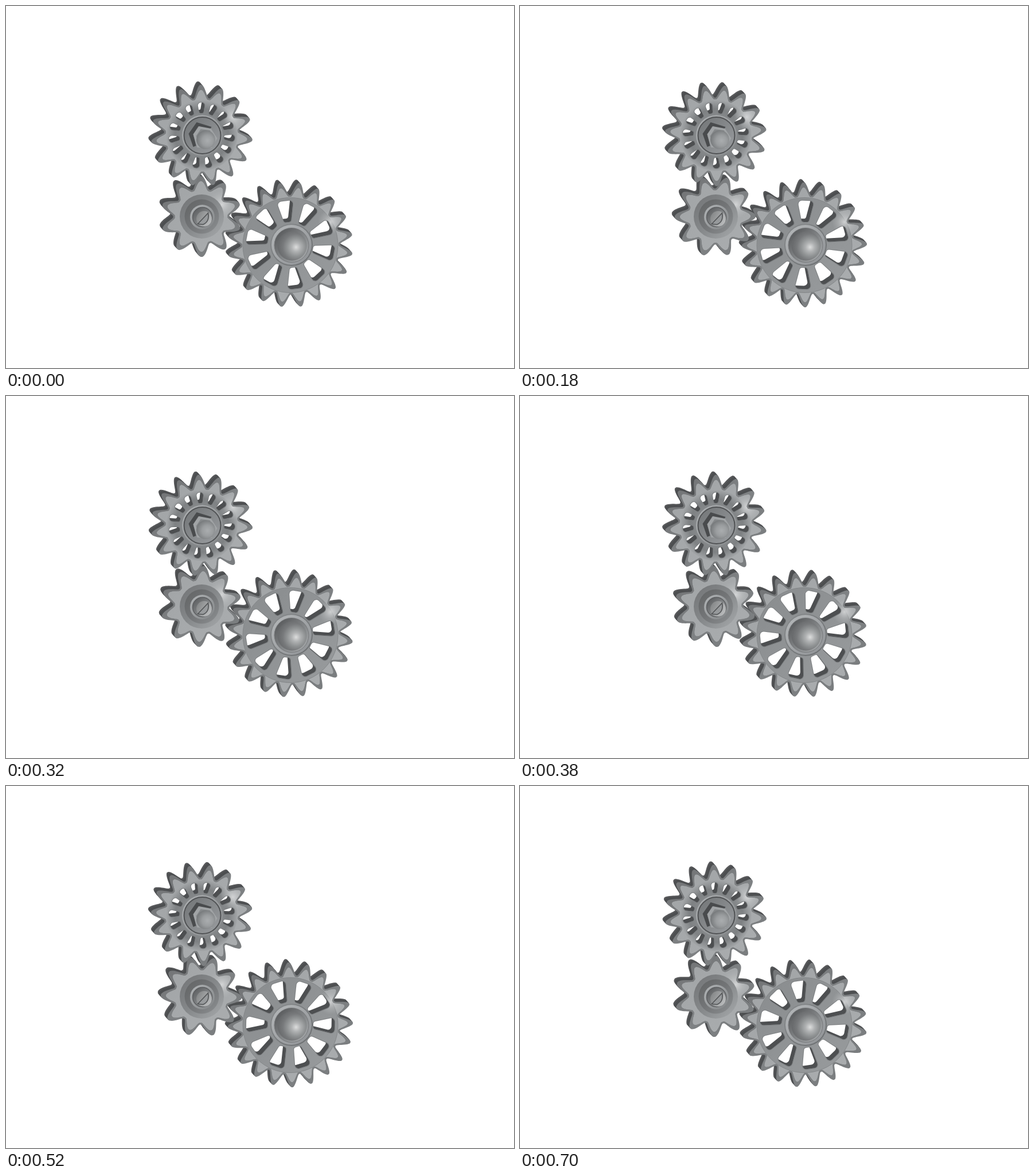
Recreate the animation shown at these times as an HTML page with a canvas. Size 886x632 px, loop 720 ms.

```html
<!DOCTYPE html>
<html lang="en">
<head>
<meta charset="utf-8">
<title>Gears</title>
<style>
html, body { margin: 0; width: 100%; height: 100%; overflow: hidden; background: #fff; }
canvas { display: block; }
</style>
</head>
<body>
<canvas id="stage" width="886" height="632"></canvas>
<script>
const ctx = document.getElementById('stage').getContext('2d');
const LOOP = 720, STEP = 20, TAU = Math.PI * 2;
const DEPTH = { x: -5.2, y: -5.8 };

// Closed outline of n rounded teeth around the origin, first tip pointing up.
function teeth(n, root, tip, sharp = 1) {
  const path = new Path2D(), per = 28;
  for (let i = 0; i < n * per; i++) {
    const u = i / per % 1;
    const p = Math.min(u, 1 - u) * 2;
    const q = Math.min(1, Math.max(0, (p * sharp - 0.08) / 0.84));
    const fall = 0.6 * q * q * (3 - 2 * q) + 0.4 * q;
    const r = tip - (tip - root) * fall;
    const a = i / (n * per) * TAU;
    path.lineTo(r * Math.sin(a), -r * Math.cos(a));
  }
  path.closePath();
  return path;
}

// n rounded wedge openings between radii r0 and r1.
function slots(n, r0, r1, w0, w1, round) {
  const all = new Path2D(), one = new Path2D();
  const pts = [[-w0, -r0], [-w1, -r1], [w1, -r1], [w0, -r0]];
  one.moveTo(0, -r0);
  pts.forEach((p, i) => {
    const next = pts[(i + 1) % 4];
    one.arcTo(p[0], p[1], next[0], next[1], i % 3 ? round : Math.min(round, w0 * 0.75));
  });
  one.closePath();
  for (let i = 0; i < n; i++) all.addPath(one, new DOMMatrix().rotate(i * 360 / n));
  return all;
}

function spin(path, deg) {
  const out = new Path2D();
  out.addPath(path, new DOMMatrix().rotate(deg));
  return out;
}

function linear(x0, y0, x1, y1, ...colors) {
  const g = ctx.createLinearGradient(x0, y0, x1, y1);
  colors.forEach((c, i) => g.addColorStop(i / (colors.length - 1), c));
  return g;
}

function radial(x, y, r, ...colors) {
  const g = ctx.createRadialGradient(x, y, 0, x, y, r);
  colors.forEach((c, i) => g.addColorStop(i / (colors.length - 1), c));
  return g;
}

function disc(x, y, r, fill, line, width = 1) {
  ctx.beginPath();
  ctx.arc(x, y, r, 0, TAU);
  ctx.fillStyle = fill;
  ctx.fill();
  if (line) {
    ctx.strokeStyle = line;
    ctx.lineWidth = width;
    ctx.stroke();
  }
}

function poly(fill, ...pts) {
  ctx.beginPath();
  pts.forEach(p => ctx.lineTo(...p));
  ctx.closePath();
  ctx.fillStyle = fill;
  ctx.fill();
}

function ring(r0, r1, fill) {
  ctx.beginPath();
  ctx.arc(0, 0, r1, 0, TAU);
  ctx.arc(0, 0, r0, 0, TAU, true);
  ctx.fillStyle = fill;
  ctx.fill();
}

function hexHub() {
  disc(1, 0, 35.5, linear(-25, -25, 25, 25, '#a9acae', '#8d9092'));
  disc(1, 0, 32, linear(-22, -22, 22, 22, '#777a7c', '#94979a'), '#505254', 2);
  poly('#494b4d', [-23, -3], [-9, -23], [17, -15], [14, -10], [-6, -16], [-15, -2], [-10, 18], [-15, 20]);
  poly('#a1a4a6', [-15, -2], [-5, -16], [16, -12], [27, 5], [17, 22], [-8, 21]);
  poly('#85888a', [-10, 1], [-2, -11], [14, -9], [23, 6], [15, 19], [-4, 18]);
  disc(7, 7.5, 16.5, radial(10, 9, 19, '#aaadaf', '#9a9d9f', '#777a7c'));
}

function slotHub() {
  disc(1, 0, 38.5, linear(-28, -28, 28, 28, '#77797b', '#85888a', '#9da0a2'));
  disc(1, 0, 30, linear(-22, -22, 22, 22, '#666869', '#737577', '#85888a'));
  disc(2, 1, 21.5, linear(-14, -14, 16, 16, '#abaeb0', '#888b8d'));
  disc(2, 1, 17, linear(-10, -10, 14, 14, '#626466', '#9da0a2'), '#5d5f61', 1.5);
  disc(5, 4, 13.5, linear(-6, -4, 16, 8, '#868889', '#b6b8b9'));
  ctx.beginPath();
  ctx.moveTo(-6, 13);
  ctx.lineTo(12, -6);
  ctx.quadraticCurveTo(15, 9, 3, 14);
  ctx.closePath();
  ctx.fillStyle = '#979a9c';
  ctx.fill();
  ctx.strokeStyle = '#525456';
  ctx.lineWidth = 1.6;
  ctx.stroke();
}

function ballHub() {
  disc(2, 0, 37, linear(-26, -26, 26, 26, '#85888a', '#6f7274'));
  disc(2, 0, 35, linear(-25, -25, 25, 25, '#b0b3b5', '#94979a'));
  disc(2, 0.5, 30, linear(-20, -20, 22, 22, '#5c5e60', '#a0a3a5'), '#77797b', 1);
  disc(3, 2, 25.5, radial(10, 4, 31, '#dcdddd', '#b0b2b3', '#919495', '#77797b', '#696b6d'));
}

// rate is degrees per loop: two teeth
const gears = [
  { x: 341.5, y: 226, n: 15, root: 66, tip: 88.5, phase: -1, rate: 48,
    holes: slots(15, 39, 57.5, 3.5, 6.8, 5), holePhase: -1,
    glow: [54, -32, 24], hub: hexHub,
    plate() {
      ring(34, 62, radial(0, 0, 62, '#888b8d', '#888b8d', '#888b8d', '#7e8183', '#a2a5a7'));
    } },
  { x: 340.5, y: 367.5, n: 10, root: 49, tip: 70.5, phase: -0.5, rate: -72,
    glow: [36, -21, 24], hub: slotHub },
  { x: 496, y: 417, n: 20, root: 87, tip: 109, phase: 8.3, rate: 36,
    holes: slots(10, 40, 77, 6, 14.5, 6), holePhase: -7,
    glow: [70, -40, 22], hub: ballHub,
    plate() {
      disc(0, 0.5, 83, linear(-60, -60, 60, 60, '#8b8e90', '#909395', '#96999b'), '#838688', 1);
    } }
];

for (const g of gears) {
  g.body = teeth(g.n, g.root, g.tip);
  g.face = teeth(g.n, g.root - 3, g.tip - 9, 1.08);
}

function drawSide(g, k) {
  const body = spin(g.body, g.phase + g.rate * k);
  const layers = 6;
  for (let i = layers; i > 0; i--) {
    const d = i / layers;
    ctx.setTransform(1, 0, 0, 1, g.x + DEPTH.x * d, g.y + DEPTH.y * d);
    ctx.fillStyle = i > 4 ? '#58595b' : '#4d4f51';
    ctx.fill(body);
  }
}

function drawFront(g, k) {
  const turn = g.rate * k, r = g.tip * 0.7;
  const face = spin(g.face, g.phase + turn);
  ctx.setTransform(1, 0, 0, 1, g.x, g.y);
  ctx.fillStyle = linear(-r, -r, r, r, '#747678', '#7f8284', '#7a7d7f');
  ctx.fill(spin(g.body, g.phase + turn));

  ctx.save();
  ctx.clip(face);
  ctx.fillStyle = linear(-r, -r, r, r, '#a2a5a7', '#a6a9ab', '#a9acae');
  ctx.fill(face);
  if (g.plate) g.plate();
  const [gx, gy, gr] = g.glow;
  disc(gx, gy, gr, radial(gx, gy, gr, 'rgba(222,223,224,.8)', 'rgba(205,207,208,.35)', 'rgba(190,192,194,0)'));
  ctx.restore();

  if (g.holes) {
    const holes = spin(g.holes, g.holePhase + turn);
    ctx.strokeStyle = '#7c7f81';
    ctx.lineWidth = 2;
    ctx.stroke(holes);
    ctx.save();
    ctx.clip(holes);
    ctx.fillStyle = '#4d4f51';
    ctx.fill(holes);
    ctx.translate(DEPTH.x, DEPTH.y);
    ctx.fillStyle = '#fff';
    ctx.fill(holes);
    ctx.restore();
  }
  g.hub();
}

function draw() {
  const k = Math.floor(performance.now() % LOOP / STEP) * STEP / LOOP;
  ctx.setTransform(1, 0, 0, 1, 0, 0);
  ctx.fillStyle = '#fff';
  ctx.fillRect(0, 0, 886, 632);
  gears.forEach(g => drawSide(g, k));
  gears.forEach(g => drawFront(g, k));
  requestAnimationFrame(draw);
}
draw();
</script>
</body>
</html>
```
